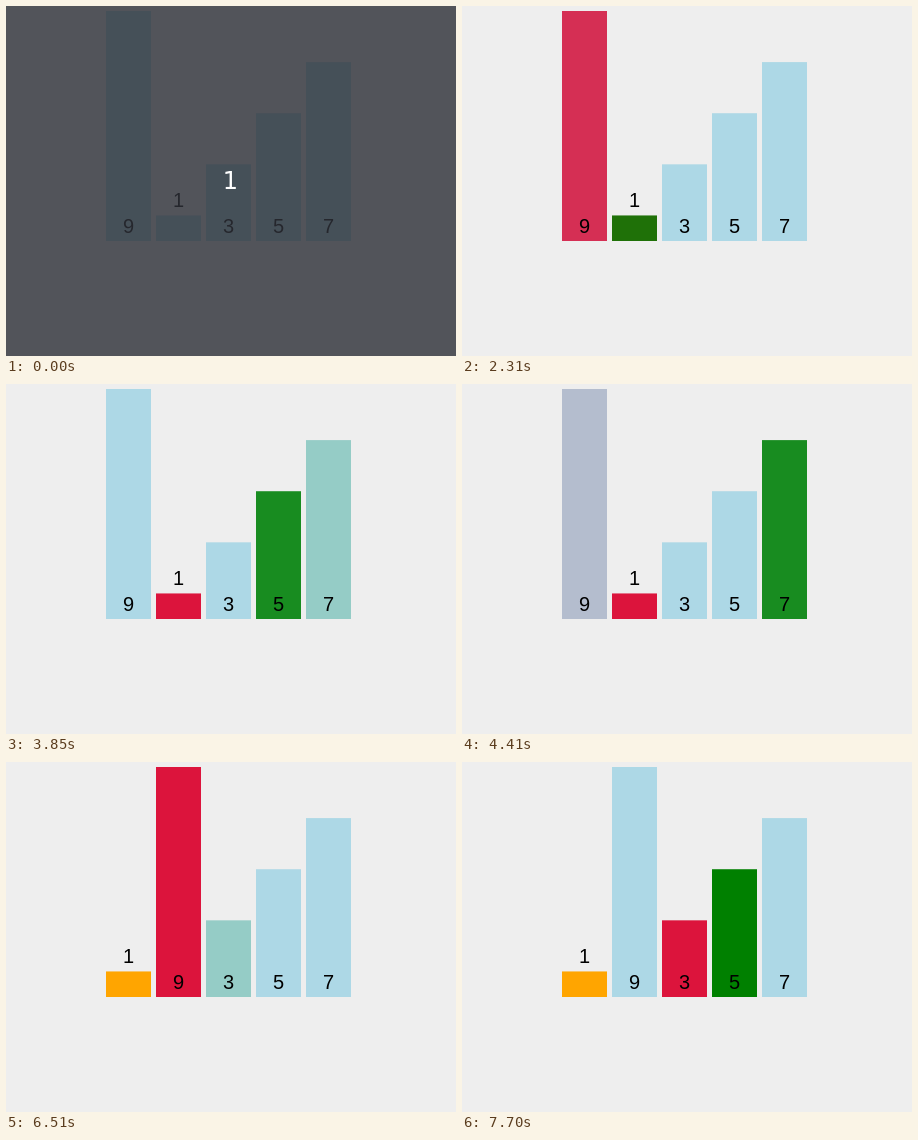
Recreate the animation shown at these times as an HTML page. Size 450 by 350 pixels, loop 8 s.

```html
<!DOCTYPE html>
<html>
<head>
<meta charset="utf-8">
<title>Selection sort</title>
<style>
  html, body { margin: 0; width: 100%; height: 100%; overflow: hidden; background: #eee; }
  svg { display: block; }
  text { font: 20px "Liberation Sans", Arial, sans-serif; text-anchor: middle; }
  #veil text { font: 24px "DejaVu Sans", sans-serif; fill: #fff; }
</style>
</head>
<body>
<svg width="450" height="350" viewBox="0 0 450 350">
  <g id="bars"></g>
  <g id="veil">
    <rect width="450" height="350" fill="rgb(46,48,56)" fill-opacity=".81"/>
    <text x="224.5" y="183">1</text>
  </g>
</svg>
<script>
const LOOP = 8000, STEP = 70, BASE = 235, PITCH = 50;
const EASE = [0.14, 0.39, 0.7, 1];
const BLUE = [173, 216, 230], RED = [220, 20, 60], GREEN = [0, 128, 0], ORANGE = [255, 165, 0];

// Each entry: start time, then the changes as value -> new colour or slot
const events = [
  [1260, { 9: RED }],
  [1750, { 1: GREEN }],
  [2310, { 9: BLUE, 1: RED }],
  [2800, { 3: GREEN }],
  [3360, { 3: BLUE, 5: GREEN }],
  [3850, { 5: BLUE, 7: GREEN }],
  [4410, { 7: BLUE, 9: RED }],
  [4900, { 9: 1, 1: 0 }],
  [5390, { 9: BLUE, 1: ORANGE }],
  [5950, { 9: RED }],
  [6510, { 3: GREEN }],
  [7000, { 9: BLUE, 3: RED }],
  [7490, { 5: GREEN }]
];

const make = (tag, attrs, parent) => {
  const el = document.createElementNS("http://www.w3.org/2000/svg", tag);
  for (const key in attrs) el.setAttribute(key, attrs[key]);
  return parent.appendChild(el);
};
const mix = (a, b, k) => a + (b - a) * k;

const veil = document.getElementById("veil");
const bars = [9, 1, 3, 5, 7].map((value, slot) => {
  const g = make("g", {}, document.getElementById("bars"));
  const height = value * 230 / 9;
  const rect = make("rect", { y: BASE - height, width: 45, height }, g);
  make("text", { x: 22.5, y: value > 1 ? 227 : 201 }, g).textContent = value;
  return { value, slot, g, rect };
});

function draw(t) {
  veil.style.display = t < 140 ? "" : "none";
  for (const bar of bars) {
    let color = BLUE, slot = bar.slot;
    for (const [start, changes] of events) {
      const next = changes[bar.value];
      if (t < start || next === undefined) continue;
      const k = EASE[Math.min(3, Math.floor((t - start) / STEP))];
      if (Array.isArray(next)) color = color.map((c, i) => mix(c, next[i], k));
      else slot = mix(slot, next, k);
    }
    bar.rect.setAttribute("fill", `rgb(${color.map(Math.round)})`);
    bar.g.setAttribute("transform", `translate(${100 + slot * PITCH} 0)`);
  }
}

const origin = performance.now();
function tick() {
  draw((performance.now() - origin) % LOOP);
  requestAnimationFrame(tick);
}
tick();
</script>
</body>
</html>
```
